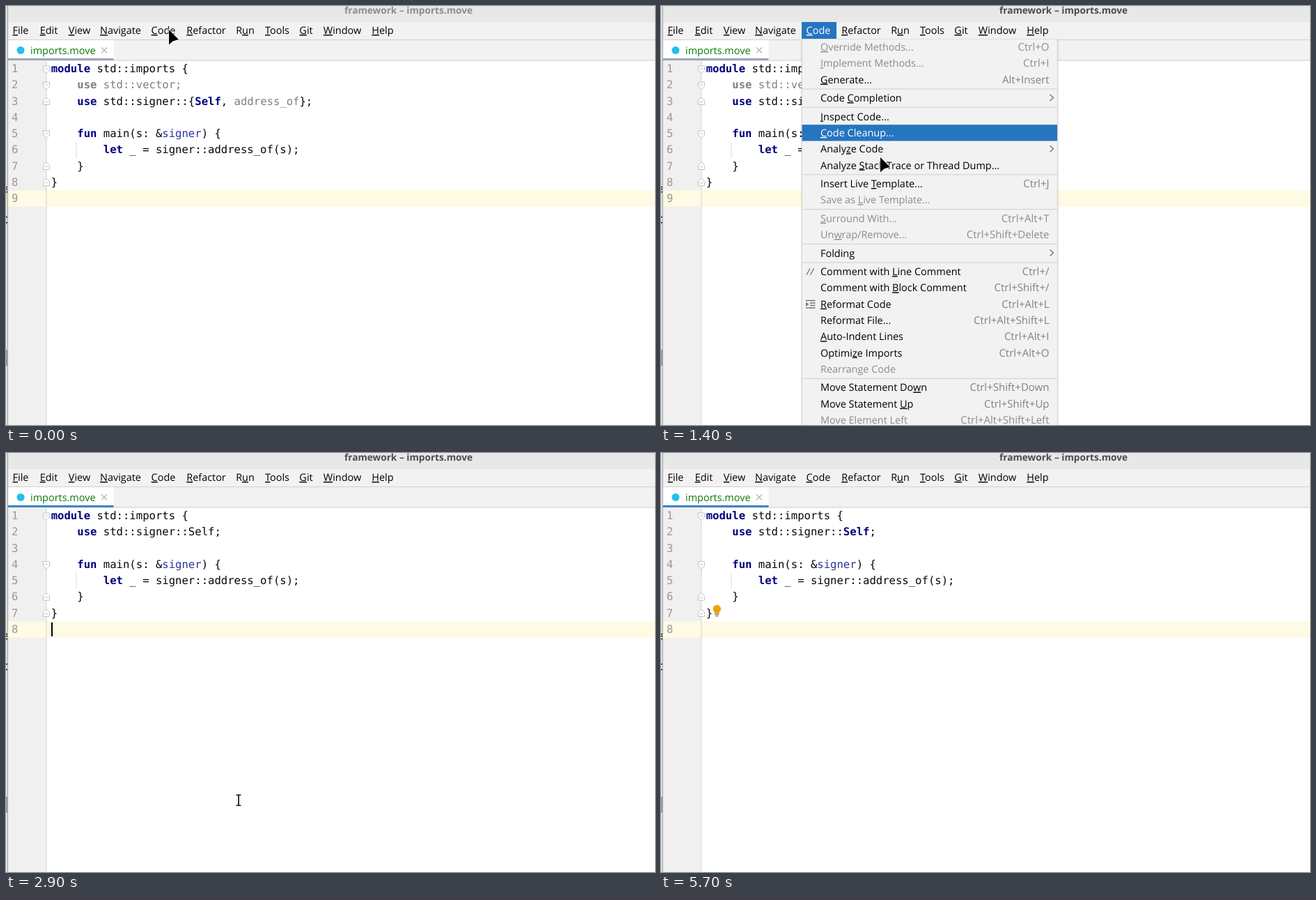
An HTML page for the animation above (5.8 s loop, 932 by 601 pixels).

```html
<!DOCTYPE html>
<html lang="en">
<head>
<meta charset="utf-8">
<title>Optimize imports</title>
<style>
  html, body { margin: 0; width: 100%; height: 100%; overflow: hidden; background: #fff; }
  svg { display: block; width: 932px; height: 601px; }
  text { white-space: pre; text-rendering: geometricPrecision; }
  .ui { font: 14.45px "Open Sans", "Noto Sans", sans-serif; }
  .key { font-size: 15px; fill: #808080; text-anchor: end; }
  .center { text-anchor: middle; }
  .title { font-size: 13.65px; font-weight: 700; }
  .white { fill: #fff; }
  .changed { fill: #0a7a0a; }
  .mnemonic { text-decoration: underline; }
  .code { font: 15.6px "DejaVu Sans Mono", monospace; fill: #080808; }
  .number { fill: #999; }
  .kw, .unusedKw { font-weight: bold; fill: #000080; }
  .unused, .unusedKw { fill: #808080; }
  .type { fill: #2f3699; }
  .off text { fill: #8c8c8c; }
  .row rect { fill: none; }
  .row.on rect { fill: #2675bf; }
  .row.on text { fill: #fff; }
  .line { fill: none; stroke: #757575; stroke-width: 1.4; }
  .fold { fill: #fff; stroke: #c2c2c2; }
</style>
</head>
<body>
<svg id="stage" viewBox="0 0 932 601" xmlns="http://www.w3.org/2000/svg"></svg>
<script>
const LOOP = 5800;
const LINE = 23.25;
const ROW = 23.3;

const rect = (x, y, w, h, fill) => `<rect x="${x}" y="${y}" width="${w}" height="${h}" fill="${fill}"/>`;
const text = (x, y, cls, body) => `<text x="${x}" y="${y}" class="${cls}">${body}</text>`;
const line = d => `<path class="line" d="${d}"/>`;

// "_" marks the mnemonic letter of a label.
const label = s => s.replace(/_(.)/, '<tspan class="mnemonic">$1</tspan>');

// Paired marks select a token style.
const tokens = { '*': 'kw', '~': 'unused', '%': 'unusedKw', '^': 'type' };
const highlight = s => s.replace(/&/g, '&amp;').replace(/([*~%^])(.+?)\1/g,
  (_, mark, body) => `<tspan class="${tokens[mark]}">${body}</tspan>`);

const lineCentre = n => 90 + (n - 1) * LINE;

function foldMark(n, dir) {
  const y = lineCentre(n) + (dir > 0 ? 1 : 0);
  return `<path class="fold" transform="translate(58 ${y}) scale(1 ${dir})"
    d="M-4.5 -5H4.5V1L0 5.5L-4.5 1ZM-2.2 -1H2.2"/>`;
}

function codePage(id, lines, opens, closes, guide) {
  let out = rect(3, lineCentre(lines.length) - 11.3, 929, LINE, '#fffae3') + rect(57.5, 79, 1, 522, '#d2d2d2');
  lines.forEach((s, i) => {
    const y = lineCentre(i + 1) + 5.2;
    out += text(8, y, 'code number', i + 1) + text(64.7, y, 'code', highlight(s));
  });
  out += rect(100.5, lineCentre(guide) - 11.5, 1, LINE, '#d9d9d9');
  out += opens.map(n => foldMark(n, 1)).join('') + closes.map(n => foldMark(n, -1)).join('');
  return `<g id="${id}">${out}</g>`;
}

const mainFunction = [
  '',
  '    *fun* main(s: &^signer^) {',
  '        *let* _ = signer::address_of(s);',
  '    }',
  '}',
  ''
];
const before = ['*module* std::imports {', '    %use% ~std::vector;~',
  '    *use* std::signer::{*Self*, ~address_of~};', ...mainFunction];
const after = self => ['*module* std::imports {', `    *use* std::signer::${self};`, ...mainFunction];

const menuBar = [['_File', 21], ['_Edit', 61.5], ['_View', 105.5], ['_Navigate', 164.5], ['_Code', 226],
  ['_Refactor', 287.5], ['R_un', 343.5], ['_Tools', 389.5], ['_Git', 431], ['_Window', 483], ['_Help', 541]];

// Groups of [label, shortcut]; "!" disables an item and ">" opens a submenu.
const menuGroups = [
  [['!_Override Methods...', 'Ctrl+O'], ['!_Implement Methods...', 'Ctrl+I'], ['_Generate...', 'Alt+Insert']],
  [['Code _Completion', '>']],
  [['_Inspect Code...', ''], ['_Code Cleanup...', ''], ['Analy_ze Code', '>'],
    ['Analyze _Stack Trace or Thread Dump...', '']],
  [['Insert Live _Template...', 'Ctrl+J'], ['!Save as _Live Template...', '']],
  [['!_Surround With...', 'Ctrl+Alt+T'], ['!Un_wrap/Remove...', 'Ctrl+Shift+Delete']],
  [['Folding', '>']],
  [['Comment with _Line Comment', 'Ctrl+/'], ['Comment with _Block Comment', 'Ctrl+Shift+/'],
    ['_Reformat Code', 'Ctrl+Alt+L'], ['Reformat File...', 'Ctrl+Alt+Shift+L'], ['_Auto-Indent Lines', 'Ctrl+Alt+I'],
    ['Optimi_ze Imports', 'Ctrl+Alt+O'], ['!Rearrange Code', '']],
  [['Move Statement Do_wn', 'Ctrl+Shift+Down'], ['Move Statement _Up', 'Ctrl+Shift+Up'],
    ['!Move Element Left', 'Ctrl+Alt+Shift+Left']]
];

function menuRow([name, key], y) {
  const off = name[0] === '!';
  const tail = key === '>' ? line(`M558.5 ${y - 5}l5 4.5l-5 4.5`) : text(557.5, y + 5, 'ui key', key);
  return `<g class="row ${off ? 'off' : ''}"><rect x="202.5" y="${y - ROW / 2}" width="366.5" height="${ROW}"/>
    ${text(229, y + 5, 'ui', label(off ? name.slice(1) : name))}${tail}</g>`;
}

function codeMenu() {
  let out = rect(200.5, 48, 371, 560, '#0001') + rect(202, 47, 367.5, 560, '#cdcdcd')
    + rect(202.8, 47.5, 366, 560, '#f2f2f2') + rect(202, 23, 50, 24, '#2675bf')
    + text(226, 40, 'ui center white', label('_Code'));
  let y = 59;
  menuGroups.forEach((group, i) => {
    if (i) {
      out += rect(203, y - 10.4, 366, 1, '#cfcfcf');
      y += 3.2;
    }
    group.forEach(item => {
      out += menuRow(item, y);
      y += ROW;
    });
  });
  out += line('M209 385.5l5 -9M214.5 385.5l5 -9')
    + line('M208 422.5h13.5M214 426h7.5M214 429.5h7.5M208 433h13.5')
    + '<path fill="#3a8bc0" d="M208 424.5l4.5 3.3l-4.5 3.3z"/>';
  return `<g id="menu">${out}</g>`;
}

const frameParts = [
  rect(0, 0, 932, 23.5, '#e8e8e8'),
  rect(0, 23.5, 932, 55, '#f2f2f2'),
  rect(3, 48, 929, 1, '#d1d1d1'),
  rect(3, 49, 151.5, 29, '#fff'),
  rect(3, 77.5, 929, 1, '#d1d1d1'),
  '<rect id="underline" x="3" y="75" width="151.5" height="3"/>',
  rect(3, 78.5, 55, 523, '#f0f0f0'),
  '<text id="title" class="ui center title" x="578" y="11">framework – imports.move</text>',
  ...menuBar.map(([s, x]) => text(x, 40, 'ui center', label(s))),
  '<circle cx="21" cy="63.5" r="5.5" fill="#22c0ee"/>',
  text(35, 68.5, 'ui changed', 'imports.move'),
  '<path d="M137 59.5l8 8m0 -8l-8 8" stroke="#b5b5b5" stroke-width="1.2"/>'
];

const leftEdge = rect(0, 0, 2, 601, '#dedede') + rect(0, 493, 2, 23, '#9c9c9c') + rect(2, 0, 1, 601, '#a3a3a3')
  + [259, 262, 266, 302, 310].map(y => rect(0, y, 2, 1.5, '#222')).join('');

const beamShape = 'M-3.5 -7.5H3.5M0 -7.5V7.5M-3.5 7.5H3.5';
const overlays = [
  '<rect id="caret" x="65" y="243" width="2" height="20"/>',
  `<g id="bulb"><circle cx="80.3" cy="223.8" r="5.7" fill="#eda200"/>
    <path fill="#eda200" d="M77 227h6.6v3.3h-6.6z"/>
    <path stroke="#6e6e6e" stroke-width="1.3" d="M77 231.3h6.6M78 233.7h4.6"/></g>`,
  `<path id="arrow" stroke="#fff" stroke-width="1.4" paint-order="stroke"
    d="M0 0V21.5L5.5 16.5L14 14Z"/>`,
  `<g id="beam" fill="none"><path stroke="#fff" stroke-width="3.5" d="${beamShape}"/>
    <path stroke="#111" stroke-width="1.7" d="${beamShape}"/></g>`
];

const stage = document.getElementById('stage');
stage.innerHTML = frameParts.join('')
  + codePage('unsorted', before, [1, 2, 5], [3, 7, 8], 6)
  + codePage('resolving', after('Self'), [1, 4], [6, 7], 5)
  + codePage('optimized', after('*Self*'), [1, 4], [6, 7], 5)
  + leftEdge + codeMenu() + overlays.join('');

const $ = id => document.getElementById(id);
const rows = [...stage.querySelectorAll('.row')];
const show = (id, visible) => $(id).setAttribute('display', visible ? 'inline' : 'none');
const during = (t, from, to) => t >= from && t < to;

// The screen updates ten times a second, so every track holds its value.
const at = (track, t) => track.filter(k => k[0] <= t).pop();

const pointer = [
  [0, 234, 34], [200, 233.5, 33], [1100, 238, 44], [1200, 266, 92], [1300, 296, 163], [1400, 315, 217],
  [1500, 324, 340], [1600, 330, 464], [1700, 332, 482], [1800, 332.5, 492], [1900, 332, 497], [2100, 333, 497],
  [2900, 334, 498], [3600, 328, 495], [3700, 316, 488], [3800, 300, 478], [3900, 288, 470],
  [4100, 210, 385], [4200, 115, 270], [4300, 67, 213], [4500, 72.5, 154], [4700, 389, 100],
  [4900, 130, 118], [5100, 128, 88], [5200, 126, 40], [5300, 124, 4], [5400, 124, -40]
];
const selection = [[0, -1], [1200, 0], [1300, 2], [1400, 5], [1500, 8], [1600, 15],
  [1700, 16], [1800, 17], [1900, 18]];
const caretTrack = [[0, 0], [2900, 1], [3700, 0], [4200, 1], [4900, 0], [5200, 1], [5700, 0]];

function render(t) {
  const [, x, y] = at(pointer, t);
  const overEditor = t >= 2900 && y > 78;
  const selected = at(selection, t)[1];

  $('title').setAttribute('fill', t < 600 ? '#8c8c8c' : '#4c4c4c');
  $('underline').setAttribute('fill', t < 2900 ? '#9ca7b8' : '#4083c9');
  show('unsorted', t < 2900);
  show('resolving', during(t, 2900, 3100));
  show('optimized', t >= 3100);
  show('menu', during(t, 600, 2900));
  rows.forEach((row, i) => row.classList.toggle('on', i === selected));
  show('caret', at(caretTrack, t)[1]);
  show('bulb', t >= 3700);
  show('arrow', !overEditor);
  show('beam', overEditor);
  $(overEditor ? 'beam' : 'arrow').setAttribute('transform', `translate(${x} ${y})`);
}

const start = performance.now();
function tick() {
  render((performance.now() - start) % LOOP);
  requestAnimationFrame(tick);
}
render(0);
requestAnimationFrame(tick);
</script>
</body>
</html>
```
